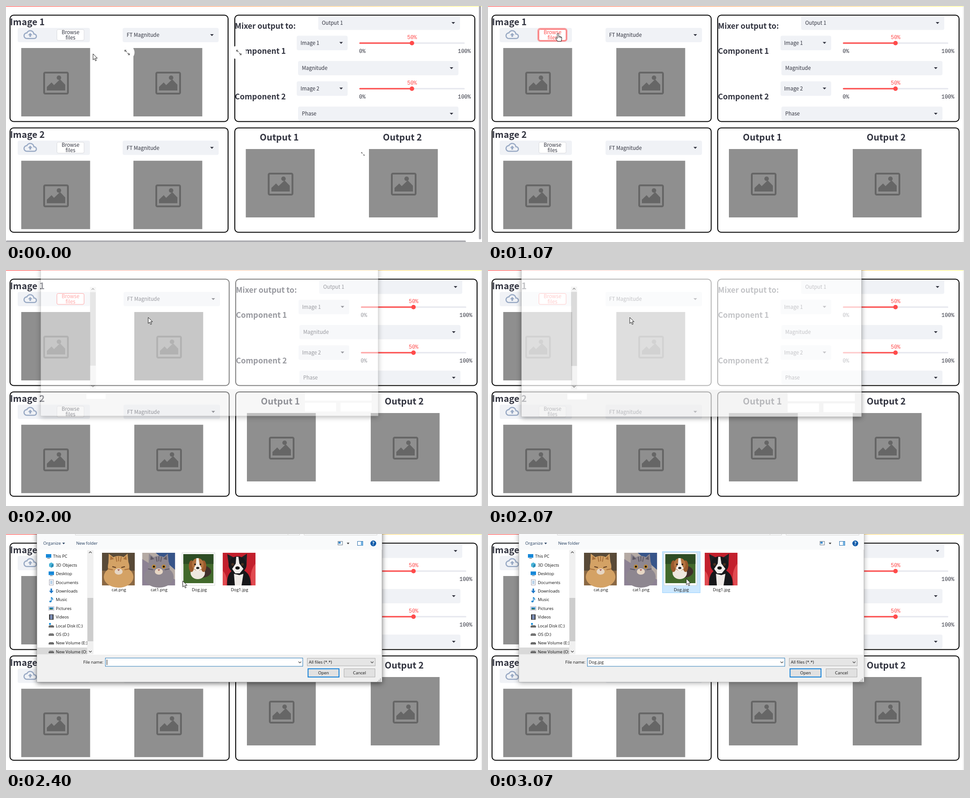
These frames come from a looping animation (1061x528 px, 3140 ms). An HTML page:

```html
<!DOCTYPE html>
<html lang="en">
<head>
<meta charset="utf-8">
<title>Image mixer</title>
<style>
  html, body { margin: 0; width: 100%; height: 100%; overflow: hidden; background: #fff; }
  svg { display: block; width: 100%; height: 100%; }
  text { white-space: pre; }
  .ui, .title, .label { font-family: "Noto Sans CJK SC", "Noto Sans CJK JP", "Noto Sans CJK", "Open Sans", sans-serif; fill: #31333f; }
  .ui { font-size: 11.46px; }
  .title { font-size: 20px; font-weight: 700; }
  .label { font-size: 17.2px; font-weight: 700; }
  .mono { font: 12px "Liberation Mono", monospace; fill: #31333f; }
  .win { font: 9.4px "Open Sans", "Noto Sans", sans-serif; fill: #111; }
  .mid { text-anchor: middle; }
  .end { text-anchor: end; }
  .button rect { fill: #fff; stroke: #d9dade; }
  .button.hot rect { stroke: #ff4b4b; }
  .button.hot text { fill: #ff4b4b; }
  .button.down rect { fill: #ff4b4b; }
  .button.down text { fill: #fff; }
  .button .ring { fill: none !important; stroke: #ff4b4b80 !important; stroke-width: 3; display: none; }
  .button.focus .ring { display: block; }
  #frame { filter: drop-shadow(0 3px 6px #0008); }
  #frame.idle { filter: drop-shadow(0 2px 6px #0005); }
</style>
</head>
<body>
<svg id="stage" viewBox="0 0 1061 528" preserveAspectRatio="none"></svg>
<script>
const RED = '#ff4b4b', INK = '#31333f';
const rect = (x, y, w, h, fill, extra = '') =>
  `<rect x="${x}" y="${y}" width="${w}" height="${h}" fill="${fill}" ${extra}/>`;
const circle = (x, y, r, fill) => `<circle cx="${x}" cy="${y}" r="${r}" fill="${fill}"/>`;
const ellipse = (x, y, rx, ry, fill) => `<ellipse cx="${x}" cy="${y}" rx="${rx}" ry="${ry}" fill="${fill}"/>`;
const path = (d, fill, extra = '') => `<path d="${d}" fill="${fill}" ${extra}/>`;
const line = (d, color, width = 1) => path(d, 'none', `stroke="${color}" stroke-width="${width}"`);
const text = (x, y, value, cls, extra = '') => `<text x="${x}" y="${y}" class="${cls}" ${extra}>${value}</text>`;
const group = (x, y, body, extra = '') => `<g transform="translate(${x} ${y})" ${extra}>${body}</g>`;
const layer = (id, body) => `<g id="${id}">${body}</g>`;

// ---- web page ----
const panel = (x, y, right, h) => rect(x, y, right - x, h, '#fff', 'rx="8" stroke="#000" stroke-width="2"');

const select = (x, right, y, h, label, textX, arrowX) =>
  rect(x, y, right - x, h, '#f0f2f6', 'rx="4"') + text(textX, y + 20.3, label, 'ui') +
  path(`M${arrowX - 4} ${y + 14}h8l-4 4.2z`, INK);

const placeholder = (x, y) => group(x, y,
  rect(0, 0, 153.5, 153, '#8f8f8f') +
  rect(51, 55, 53, 47, 'none', 'rx="2.5" stroke="#666" stroke-width="4"') + circle(84, 66.5, 5, '#666') +
  path('M57 95V87L67.5 77 73 83 86.5 70 98 82V95Z', '#666'));

const CLOUD = 'M19.35 10.04C18.67 6.59 15.64 4 12 4 9.11 4 6.6 5.64 5.35 8.04 2.34 8.36 0 10.91 0 14c0 3.31 2.69 6 6 6h13c2.76 0 5-2.24 5-5 0-2.64-2.05-4.78-4.65-4.96z' +
  'M19 18H6c-2.21 0-4-1.79-4-4 0-2.05 1.53-3.76 3.56-3.97l1.07-.11.5-.95C8.08 7.14 9.94 6 12 6c2.62 0 4.88 1.86 5.39 4.43l.3 1.5 1.53.11c1.56.1 2.78 1.41 2.78 2.96 0 1.65-1.35 3-3 3zM8 13h2.55v3h2.9v-3H16l-4-4z';

const uploader = (y, cls) =>
  rect(26, y, 161, 32, '#f0f2f6', 'rx="4"') +
  path(CLOUD, '#98a9c4', `transform="translate(39 ${y}) scale(1.25)"`) +
  `<g class="button ${cls}">` +
    rect(111.5, y + 1.5, 64, 28, 'none', 'rx="5" class="ring"') +
    rect(113.5, y + 3.5, 60.5, 24.5, '#fff', 'rx="3"') +
    text(143.7, y + 13.7, 'Browse', 'ui mid') + text(143.7, y + 25.5, 'files', 'ui mid') + '</g>';

const slider = (x, y) =>
  rect(x, y - 1.5, 235, 3, '#e6e7ee', 'rx="1.5"') + rect(x, y - 1.5, 117, 3, RED, 'rx="1.5"') +
  circle(x + 117.3, y, 5, RED) +
  text(x + 117.5, y - 9, '50%', 'mono mid', `style="fill:${RED}"`) +
  text(x - .5, y + 22, '0%', 'mono') + text(x + 248.5, y + 22, '100%', 'mono end');

const expand = (x, y, scale, back) => group(x, y, (back ? circle(0, 0, 16.5, '#fff') : '') +
  `<g transform="scale(${scale})">` + path('M-6-1.2V-6H-1.2ZM6 1.2V6H1.2Z', '#777') +
  line('M-4-4L-1-1M1 1L4 4', '#777', 2) + '</g>');

function page(wide) {
  const at = (narrow, full) => wide ? full : narrow;
  const sourcePanel = (n, y) =>
    panel(9, y, at(495, 497.5), n === 1 ? 238 : 233.5) + text(9, y + 22, 'Image ' + n, 'title') +
    uploader(y + 28.5, n === 1 ? 'first' : '') +
    select(at(260, 262), at(474, 477), y + 28.5, 32, 'FT Magnitude', at(269, 270), at(459, 462)) +
    placeholder(34, y + 73.5) + placeholder(at(284, 286), y + 73.5);
  const component = (n, dy, part) =>
    text(at(510, 512.5), 106.5 + dy, 'Component ' + n, 'label') +
    select(at(648, 652), at(761.5, 765), 66.5 + dy, 32.5, 'Image ' + n, at(656.5, 660), at(747, 750)) +
    slider(at(787.5, 791), 83 + dy) +
    select(at(651, 654), at(1008.5, 1013), 123 + dy, n === 1 ? 32 : 31, part, at(659.5, 662.5), at(993, 998));
  const output = (n, x) => text(x + 74.5, 301, 'Output ' + n, 'title mid') + placeholder(x, 320);
  const left = at(510, 512), right = at(1045, 1050);
  return rect(0, 0, 1061, 1.2, 'url(#bar)') +
    sourcePanel(1, 20.5) + sourcePanel(2, 272.7) +
    panel(left, 20.5, right, 238) + panel(left, 272.7, right, 233.5) +
    text(at(510, 512.5), 51, 'Mixer output to:', 'label') +
    select(at(696, 698), at(1012, 1017), 22, 31.5, 'Output 1', at(704, 707), at(997, 1002)) +
    component(1, 0, 'Magnitude') + component(2, 102, 'Phase') +
    output(1, at(534.5, 537)) + output(2, at(809, 813)) +
    (wide ? rect(1059, 0, 1, 528, '#dedede') :
      expand(270, 104, 1, true) + expand(519, 104, 1, true) + expand(795.5, 331, .65, false) +
      rect(1054, 0, 5, 522, '#adadb2', 'rx="2"') + rect(0, 524.5, 1025, 4, '#adadb2', 'rx="2"'));
}

// ---- file dialog ----
const icons = {
  star: path('M0-6L1.8-2 6-1.5 2.9 1.5 3.7 5.8 0 3.7-3.7 5.8-2.9 1.5-6-1.5-1.8-2Z', '#2f8fe0'),
  screen: rect(-6, -5, 12, 8, '#1688d8') + rect(-3, 4, 6, 1, '#456'),
  arrow: path('M-1.7-5.5H1.7V-.5H5L0 5.5-5-.5H-1.7Z', '#1f78c8'),
  paper: rect(-4.5, -6, 9, 12, '#fff', 'stroke="#889" stroke-width=".8"') + line('M-2.5-2.5h5M-2.5 0h5M-2.5 2.5h5', '#4a8ac4'),
  picture: rect(-6, -4, 12, 8, '#fff', 'stroke="#99a" stroke-width=".8"') + rect(-4.5, -2.5, 9, 5, '#3b8fcc') + path('M-4.5 2.5L-1-.5 4.5 2.5Z', '#27643d'),
  drive: path('M-6 0L-4-2H4L6 0V3H-6Z', '#555') + rect(-6, -.5, 12, 1, '#aaa'),
  system: path('M-6 1L-4-1H4L6 1V4H-6Z', '#666') + rect(-5, -6, 4, 4, '#1a91dc'),
  folder: rect(-4.5, -6, 9, 12, '#f8d775') + rect(-4.5, -6, 2.5, 12, '#e8b84a'),
  cube: path('M0-6L5-3V3L0 6-5 3V-3Z', '#4bb4d8') + path('M0 0L5-3V3L0 6Z', '#2789b5'),
  note: ellipse(-2, 4, 2.6, 2, '#1b86d0') + line('M0 4V-5Q4-3 3 1', '#1b86d0', 1.6),
  film: rect(-5, -6, 10, 12, '#333') + rect(-2.8, -5, 5.6, 10, '#7d8fb8'),
  dot: circle(0, 0, 5.5, '#0f6cbd')
};
const pin = group(174, 0, path('M-1-3.5L3.5 1 1 1.5-.5 3-3-.5-1-1Z', '#888') + line('M-1.5 1.5L-4 4', '#888'));

const item = (y, icon, label, head = false, pinned = false) => group(0, y,
  group(head ? 95 : 101, 0, icons[icon]) + text(head ? 105 : 111, 3.4, label, 'win') + (pinned ? pin : ''));
const rows = (top, list, pins = 0) =>
  list.map(([icon, label], i) => item(top + i * 19.4, icon, label, i === 0, i > 0 && i <= pins)).join('');

const quickList = rows(56.5, [['star', 'Quick access'], ['screen', 'Desktop'], ['arrow', 'Downloads'],
  ['paper', 'Documents'], ['picture', 'Pictures'], ['drive', 'New Volume'], ['folder', '2023-05'],
  ['folder', 'build'], ['folder', 'Photos_table'], ['folder', 'Screenshots']], 5) +
  item(257, 'dot', 'Skylofto - Personal', true);
const computerList = rect(69, 254, 112, 16, '#d9d9d9') + rows(50, [['screen', 'This PC'], ['cube', '3D Objects'],
  ['screen', 'Desktop'], ['paper', 'Documents'], ['arrow', 'Downloads'], ['note', 'Music'], ['picture', 'Pictures'],
  ['film', 'Videos'], ['system', 'Local Disk (C:)'], ['drive', 'OS (D:)'], ['drive', 'New Volume (E:)'], ['drive', 'New Volume (O:)']]);

const chevron = (x, y, s) => line(`M${x - 3} ${y - s}L${x} ${y + s}L${x + 3} ${y - s}`, '#444', 1.2);
const scrollbar = (y, h) => rect(181, 36, 14, 233, '#f0f0f0') + rect(181.5, y, 13, h, '#cdcdcd') +
  chevron(188, 41, -1.5) + chevron(188, 263, 1.5);

const cat = (fur, dark, eyes) =>
  path('M14 34L15 2 31 14H43L57 2 60 34Z', fur) + ellipse(37, 54, 33, 24, fur) + ellipse(37, 31, 24, 24, fur) +
  path('M18 16L19 7 27 14ZM55 16L54 7 47 14Z', dark) + line('M31 9L33 20M37 8V19M43 9L41 20M13 36L24 38M61 36L50 38', dark, 2) +
  eyes + ellipse(37, 42, 9, 7, '#e6d6c4') + path('M34 37H40L37 41Z', '#a8605a');
const photos = [
  rect(0, 0, 73, 73, '#594a38') + rect(0, 40, 73, 33, '#8a6844') +
    cat('#d4a265', '#a8703c', line('M23 31L31 33M43 33L51 31', '#5a3820', 2)),
  rect(0, 0, 73, 73, '#b5aaa4') + path('M30 0H73V38Z', '#38558a') + path('M0 14L73 60V73H0Z', '#8d8294') +
    cat('#8e8790', '#5f5965', circle(26, 31, 4.5, '#c28a30') + circle(48, 31, 4.5, '#c28a30') + circle(26, 31, 2.3, '#111') + circle(48, 31, 2.3, '#111')),
  rect(-1, 0, 73, 73, '#fff', 'stroke="#ccc" stroke-width=".8"') + rect(2, 3, 67, 65, '#42692c') + rect(2, 3, 67, 22, '#2e4d25') +
    ellipse(41, 42, 23, 14, '#40302a') + ellipse(34, 45, 16, 14, '#eee8df') +
    ellipse(20, 30, 6, 13, '#9a5a2c') + ellipse(47, 30, 6, 13, '#9a5a2c') + ellipse(34, 26, 13, 14, '#b37440') +
    path('M31 12H36L38 26 43 35 34 42 25 35 30 26Z', '#f4eee6') + circle(28, 26, 1.8, '#111') + circle(40, 26, 1.8, '#111') + ellipse(34, 34, 3.5, 2.5, '#222'),
  rect(0, 0, 73, 73, '#c3202d') + path('M0 40Q12 52 8 73H0ZM73 24Q57 44 65 73H73Z', '#e14a50') +
    path('M10 73Q8 45 25 38H45Q64 48 62 73Z', '#17171a') + path('M13 24L10 3 28 12H39L54 2 53 28Z', '#202024') +
    ellipse(33, 27, 20, 19, '#18181b') + path('M30 9H35L37 24 46 36 38 46H28L21 36 29 24Z', '#f0ecea') +
    path('M25 47L37 50 46 47 42 73H27Z', '#efebe8') + circle(22, 26, 3, '#4a3020') + circle(44, 26, 3, '#4a3020') + ellipse(33, 34, 5, 3.5, '#111')
];
const names = ['cat.png', 'cat1.png', 'Dog.jpg', 'Dog1.jpg'];
const fileX = i => 214 + i * 89.7;
const files = names.map((name, i) =>
  group(fileX(i), 42, photos[i]) + text(fileX(i) + 37.5, 128, name, 'win mid')).join('');

const pushButton = (x, label, border, width) =>
  rect(x, 301.5, 69, 18.5, '#e1e1e1', `stroke="${border}" stroke-width="${width}"`) + text(x + 34.5, 314.2, label, 'win mid');

const toolbar = rect(69, -88, 769, 123, '#f9fafb') +
  line('M154.5-20V2.5H654.5V-20M628.5-20V2.5M664.5-20V2.5H827V-20', '#d5d5d5') +
  text(83, 24.3, 'Organize', 'win', 'style="fill:#1e395b"') + path('M125.5 19.5h6l-3 3.5z', '#1e395b') +
  text(156.5, 24.3, 'New folder', 'win', 'style="fill:#1e395b"') +
  rect(740, 16.5, 10, 8, '#fff', 'stroke="#678"') + rect(741, 17.5, 5, 4, '#3584c8') + path('M759.5 19.5h6l-3 3.5z', '#333') +
  rect(783.5, 16.5, 12, 9, '#fff', 'stroke="#2d71ad"') + rect(791, 17, 4.5, 8.5, '#75b4e3') +
  circle(818.7, 21, 6.5, '#0a59a8') + text(818.7, 24.8, '?', 'win mid', 'style="fill:#fff;font-weight:700;font-size:10px"');

const footer = text(217, 290, 'File name:', 'win end') +
  rect(221.5, 277.5, 440, 18.5, '#fff', 'stroke="#2a7ab8"') + chevron(655, 287, 1.5) +
  rect(671.5, 278, 151.5, 17, '#e5e5e5', 'stroke="#adadad"') + text(675, 290, 'All files (*.*)', 'win') + chevron(816, 287, 1.5) +
  pushButton(673.3, 'Open', '#0078d7', 1.8) + pushButton(753.5, 'Cancel', '#adadad', 1) +
  line('M834.5 323v8M831.5 326v5M828.5 329v2', '#aaa', 1.5) +
  layer('caret', rect(224.5, 281, 1, 12, '#000')) + layer('typed', text(224.5, 290, 'Dog.jpg', 'win'));

const dialog = rect(69, -88, 769, 419, '#fff', 'id="frame" stroke="#999" stroke-width=".7"') +
  rect(69.3, 270, 768.4, 60.7, '#f0f0f0') +
  layer('skeleton', scrollbar(48, 168) + rect(173, 279, 44, 13, '#fff') + rect(671, 277, 152, 19, '#fff') +
    rect(671, 301, 71, 20, '#fff') + rect(752, 301, 71, 20, '#fff')) +
  layer('content', toolbar + rect(0, 39.5, 84, 92, '#e5f3ff', 'id="tile"') + files +
    `<g clip-path="url(#side)">${layer('quick', quickList)}${layer('computer', computerList)}</g>` +
    layer('quickBar', scrollbar(48, 188)) + layer('computerBar', scrollbar(143, 97)) + footer);

const pointer = layer('arrow', path('M0 0V13.6L3.1 10.7 5.4 15.8 7.6 14.8 5.3 9.8H9.6Z', '#fff', 'stroke="#000" stroke-width=".9"')) +
  layer('hand', path('M-1.6 1.2Q0-1 1.6 1.2V6.5L6 7.6Q8.8 8.2 8.5 11.5L7.2 18H-1L-4.9 12Q-5.2 9.3-3.3 10L-1.6 11.8Z', '#fff', 'stroke="#000" stroke-width=".9"') +
    line('M1.6 7V10M4.2 7.5V10.5M6.6 8V11', '#000', .8));

const $ = id => document.getElementById(id);
$('stage').innerHTML =
  `<defs><linearGradient id="bar"><stop stop-color="${RED}"/><stop offset="1" stop-color="#fffd80"/></linearGradient>` +
  `<clipPath id="side">${rect(69, 36, 112, 233.5, '#000')}</clipPath></defs>` +
  rect(0, 0, 1061, 528, '#fff') + layer('narrow', page(false)) + layer('wide', page(true)) +
  layer('dialog', dialog) + layer('pointer', pointer);

// ---- motion ----
const LOOP = 3140, STEP = 1000 / 15;
const track = [[0, 194, 107], [67, 192, 105], [200, 178, 91], [333, 160, 74], [467, 152, 66], [533, 166, 62],
  [667, 166, 62], [733, 156, 61], [1333, 156, 61], [1600, 243, 79], [1867, 317, 102], [2000, 317, 106],
  [2200, 314, 106], [2400, 394, 105], [2667, 442, 100], [LOOP, 442, 100]];

function pointerAt(t) {
  const i = Math.max(1, track.findIndex(key => key[0] >= t));
  const [t0, x0, y0] = track[i - 1], [t1, x1, y1] = track[i];
  const p = (t - t0) / (t1 - t0);
  return [x0 + (x1 - x0) * p, y0 + (y1 - y0) * p];
}
const show = (id, on) => $(id).style.display = on ? '' : 'none';
const firstButtons = document.querySelectorAll('.first');

function draw(now) {
  const t = Math.floor((now % LOOP + 6.7) / STEP) * STEP;
  const [x, y] = pointerAt(Math.min(t, LOOP));
  const between = (from, to) => t > from - 10 && t < to - 10;
  const overButton = x > 113 && x < 174 && y > 52 && y < 77;

  show('narrow', t < 120);
  show('wide', t >= 120);
  for (const button of firstButtons) {
    button.classList.toggle('hot', overButton || t > 400);
    button.classList.toggle('down', between(733, 1067));
    button.classList.toggle('focus', between(1067, 1200));
  }
  $('pointer').setAttribute('transform', `translate(${x} ${y})`);
  show('hand', overButton);
  show('arrow', !overButton);

  const p = Math.min(1, Math.max(0, (t - 1867) / 333));
  const scale = 1 - .036 * (1 - p);
  show('dialog', p > .01);
  $('dialog').style.opacity = 1 - (1 - p) ** 1.35;
  $('dialog').setAttribute('transform', `translate(453.5 121) scale(${scale}) translate(-453.5 -121)`);
  $('frame').classList.toggle('idle', t > 2990);
  show('skeleton', p < .75);
  show('content', p >= .75);

  const scrolled = t > 2250, chosen = t > 2860;
  show('quick', !scrolled);
  show('quickBar', !scrolled);
  show('computer', scrolled);
  show('computerBar', scrolled);
  show('caret', t < 2590);
  show('typed', chosen);

  const index = Math.floor((x - 209.5) / 89.7);
  const tile = $('tile');
  show('tile', x - 209.5 - index * 89.7 < 84 && (index < 2 || t > 2450));
  tile.setAttribute('x', 209.5 + index * 89.7);
  tile.setAttribute('fill', chosen ? '#cce8ff' : '#e5f3ff');
  tile.setAttribute('stroke', chosen ? '#99d1ff' : 'none');
}

const start = performance.now();
(function frame() {
  draw(performance.now() - start);
  requestAnimationFrame(frame);
})();
</script>
</body>
</html>
```
